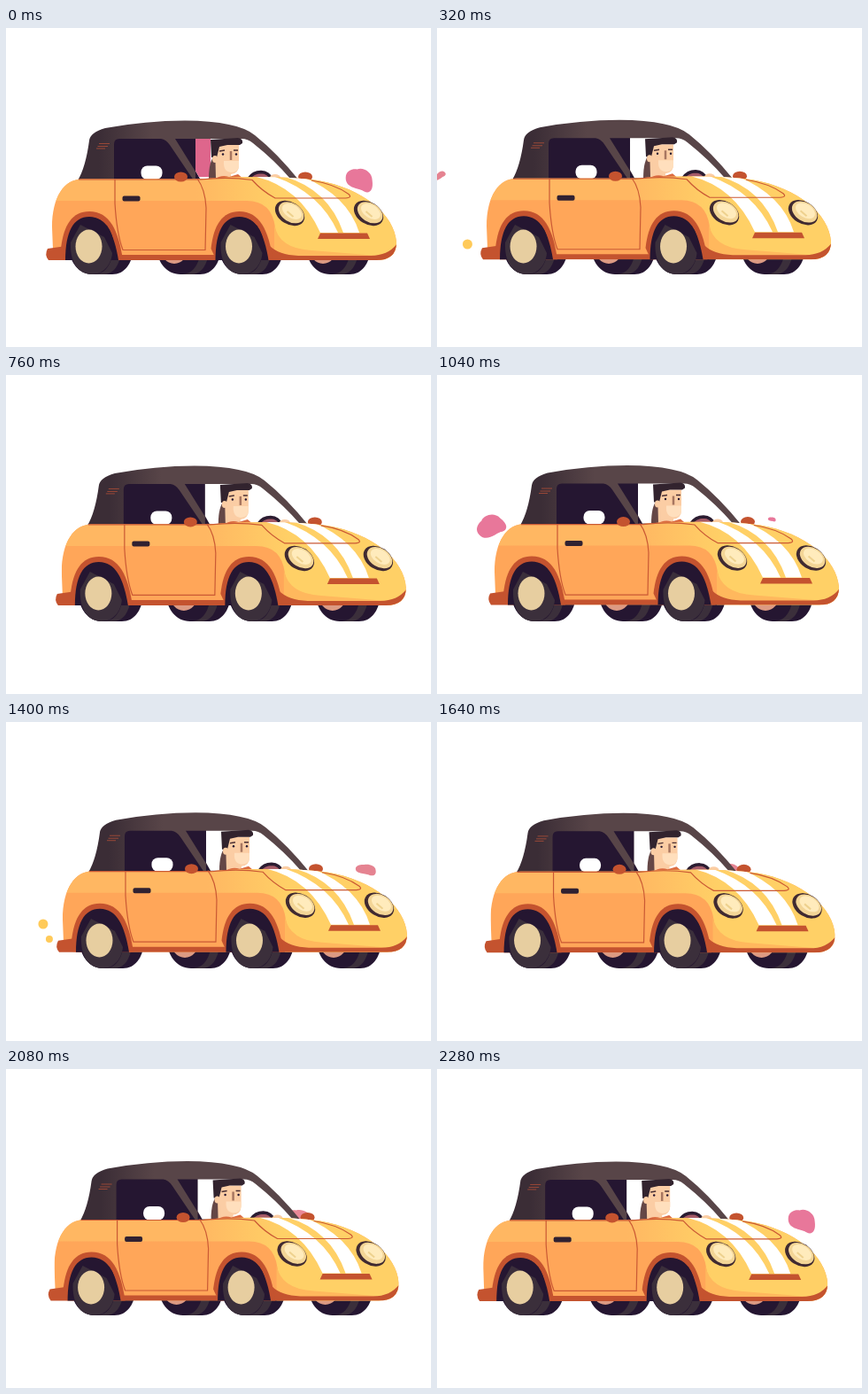
Write an HTML page that moves like this. It is 480 px wide and 360 px high and loops after 2.32 s.

```html
<!DOCTYPE html>
<html lang="en">
<head>
<meta charset="utf-8">
<title>Driving car</title>
<style>
  html, body { margin: 0; width: 100%; height: 100%; overflow: hidden; background: #fff; }
  svg { display: block; width: 100vw; height: 100vh; }
  .red { fill: #c4532f; }
  .dark { fill: #251631; }
  .skin { fill: #fbcda4; }
  .line { fill: none; stroke: #ca5934; stroke-width: 1.2; }
</style>
</head>
<body>
<svg viewBox="0 0 480 360">
  <defs>
    <linearGradient id="shoulder" gradientUnits="userSpaceOnUse" x1="215" x2="310">
      <stop stop-color="#ffb762"/><stop offset="1" stop-color="#ffd066"/>
    </linearGradient>
    <linearGradient id="roof" gradientUnits="userSpaceOnUse" x1="105" x2="165">
      <stop stop-color="#3b2d36"/><stop offset="1" stop-color="#584548"/>
    </linearGradient>
    <clipPath id="shell">
      <path d="M53 250L52 225C52 190 66 170.500 86 170.500H220Q300 165 352 172C404 181 439 211 441 242Q441 262 418 262H70Q53 262 53 250Z"/>
    </clipPath>
    <g id="tire">
      <path class="dark" d="M70 240C70 264 82 278 98 278H120C134 278 142 266 144 250V215H70Z"/>
      <path fill="#3b2f3b" d="M98 278C112 278 119 268 121 250L129 259Q124 278 110 278Z"/>
    </g>
    <g id="well">
      <path class="red" d="M62 249C65 222 75 207 94 207C117 207 127 228 132 262H68Z"/>
      <path class="dark" d="M67 262C67 230 76 213 94 213C113 213 122 232 127 262Z"/>
    </g>
    <g id="wheel">
      <ellipse class="dark" cx="96.500" cy="246" rx="25" ry="32"/>
      <path fill="#3b2f3b" d="M84 222L73 242C72 264 81 278 97 278C111 278 119 266 120 254L111 236Z"/>
      <ellipse id="hub" cx="93.500" cy="246.500" rx="15" ry="19" fill="#e7cea0"/>
    </g>
    <g id="lamp">
      <g transform="rotate(32)">
        <ellipse rx="18" ry="12.500" fill="#402a31"/>
        <ellipse cx="1" cy="-1.500" rx="15.500" ry="10.500" fill="#f3d596"/>
        <ellipse cx="1" cy="-3" rx="12" ry="7.500" fill="#ffebbc"/>
      </g>
      <path d="M-3 -2L4 4" stroke="#eed18e" stroke-width="2"/>
    </g>
  </defs>

  <g id="puffs"></g>

  <g class="roll">
    <use href="#tire" x="99"/>
    <use href="#tire" x="268"/>
    <ellipse cx="190" cy="247" rx="16" ry="19" fill="#dc9a83"/>
    <ellipse cx="358" cy="247" rx="16" ry="19" fill="#dc9a83"/>
    <use href="#tire"/>
    <use href="#tire" x="169.500"/>
  </g>

  <g id="body">
    <!-- cabin -->
    <path fill="url(#roof)" d="M81 172Q90 157 94 127Q95 118 112 113Q158 104.500 202 104.500Q262 105 281 121Q306 141 331 172Z"/>
    <path class="dark" d="M122 172V131Q122 125 128 125H175Q181 126 185 132L212 172Z"/>
    <path class="dark" d="M191 125H214V170H219Z"/>
    <path fill="#fff" d="M214 125H266Q273 125 279 130Q303 149 321 170H219L214 161Z"/>
    <path id="flash" fill="#de668c" d="M214 125H231V168H218L214 161Z"/>
    <rect x="152.500" y="155.500" width="24" height="15.500" rx="7" fill="#fff"/>
    <path d="M105 130.500H117M103.500 133.500H115M102 136H112" stroke="#9a4837"/>

    <!-- driver -->
    <path fill="#654746" d="M229 170Q229 150 236 143L245 170Z"/>
    <path class="skin" d="M236 132H263V155Q263 164 254 165V170H237Z"/>
    <path fill="#ffdfbd" d="M246 150H263V156Q262 163 254 163Q245 162 246 150Z"/>
    <path fill="#32232e" d="M231 126L262 124Q268 125 267 130L264 132H250L241 134L238 146H232Z"/>
    <ellipse class="skin" cx="236" cy="148" rx="3" ry="4"/>
    <path d="M241 139L247 138M257 138L262 138" stroke="#4a2f33" stroke-width="1.400"/>
    <circle class="dark" cx="245" cy="142.500" r="1.200"/>
    <circle class="dark" cx="260" cy="142.500" r="1.200"/>
    <path d="M254 139V149" stroke="#a77660" stroke-width="2.500"/>
    <path fill="#db6b40" d="M235 171Q243 165 252 168L262 165L269 171Z"/>
    <path class="skin" d="M268 171Q275 165 284 171Z"/>
    <path fill="#a65b69" stroke="#2b1c31" stroke-width="3.500" d="M274 170Q279 162.500 288 162.500Q297 163 300 171"/>
    <ellipse class="skin" cx="304" cy="169" rx="6" ry="4"/>

    <!-- bodywork -->
    <ellipse class="red" cx="338" cy="168" rx="8" ry="5.500"/>
    <g clip-path="url(#shell)">
      <path fill="#ffa659" d="M45 160H450V270H45Z"/>
      <path fill="url(#shoulder)" d="M45 160H450V270H345Q308 256 304 225Q300 195 272 195H45Z"/>
      <path fill="#ffb85d" d="M303 222Q308 249 345 251L420 257V264H303Z"/>
      <path fill="#fff" d="M283 168Q332 180 355 231H375Q355 186 304 168Z"/>
      <path fill="#fff" d="M315 168Q364 182 381 231H399Q386 189 335 168Z"/>
      <path class="red" d="M128 256H242V264H128Z"/>
      <path class="red" d="M298 246Q308 256 330 257H412Q432 257 442 243V266H298Z"/>
    </g>
    <path class="line" d="M123 171V198Q125 232 132 250.500H225L226 203Q225 182 216 170"/>
    <path class="line" d="M82 171H220Q250 167.500 278 171.500Q289 184 304 192H381Q392 192 387 187.500Q371 176 345 172"/>
    <rect x="131.500" y="189.500" width="20" height="6" rx="2" fill="#302131"/>
    <path class="red" d="M47 249L68 246V262H48Q43 256 47 249Z"/>
    <use href="#well"/>
    <use href="#well" x="169.500"/>
    <ellipse class="red" cx="197.500" cy="168" rx="7.500" ry="5.500"/>
    <use href="#lamp" x="320.500" y="209"/>
    <use href="#lamp" x="409.500" y="209"/>
    <path class="red" d="M355 231.500H408L411 238H352Z"/>
  </g>

  <g class="roll">
    <use href="#wheel"/>
    <use href="#wheel" x="169.500"/>
  </g>
</svg>
<script>
const LOOP = 2320, SPEED = 0.325;
const $ = s => document.querySelector(s);
const clamp = v => Math.max(0, Math.min(1, v));

// time, forward shift of the car
const drift = [[0, 0], [320, 4], [520, 8], [800, 11.300], [1040, 13], [1140, 13.200],
  [1400, 12], [1680, 8], [1880, 5], [2280, 0.200], [2320, 0]];

function shift(t) {
  const i = drift.findIndex(k => k[0] > t);
  const [t0, a] = drift[i - 1], [t1, b] = drift[i];
  return a + (b - a) * (t - t0) / (t1 - t0);
}

// born: time of first sight; x, y: place then; w, h: half size; end: x where it vanishes
const puffs = [
  { born: 2200, x: 438, y: 172, w: 15, h: 14, color: '#e8779a', end: -20 },
  { born: 1340, x: 426, y: 167, w: 13, h: 7.500, color: '#e58391', end: -10 },
  { born: 1800, x: 421, y: 168, w: 14, h: 9.500, color: '#e98896', end: 10 },
  { born: 980, x: 398, y: 163, w: 5, h: 3, color: '#e8779a', end: 300 },
  { born: 150, x: 90, y: 244, w: 5.500, h: 5.500, color: '#ffca59', end: 5 },
  { born: 1250, x: 91, y: 228, w: 5.500, h: 5.500, color: '#ffca59', end: 15 },
  { born: 1250, x: 98, y: 245, w: 4, h: 4, color: '#ffca59', end: 20 }
];
for (const p of puffs) {
  p.el = document.createElementNS('http://www.w3.org/2000/svg', 'path');
  p.el.setAttribute('fill', p.color);
  const round = p.w === p.h;
  p.el.setAttribute('d', round
    ? 'M-1 0A1 1 0 1 1 1 0A1 1 0 1 1 -1 0Z'
    : 'M-1 -.2C-1 -.8 -.5 -.95 -.15 -.9C.3 -1.1 1 -.7 1 0C1.1 .8 .8 1.1 .4 .9C.1 .6 -1 .7 -1 -.2Z');
  $('#puffs').append(p.el);
}

function drawPuff(p, t) {
  const age = (t - p.born + LOOP) % LOOP;
  const x = p.x - SPEED * age;
  const size = clamp(age / 70) * clamp((x - p.end) / 25);
  const turn = p.w > 12 && x < 200;
  p.el.setAttribute('transform',
    `translate(${x} ${p.y}) rotate(${turn ? -45 : 0}) scale(${p.w * size} ${p.h * size})`);
}

function draw(now) {
  const t = now % LOOP, x = shift(t);
  $('#body').setAttribute('transform', `translate(${x} ${-x * 0.19})`);
  document.querySelectorAll('.roll').forEach(g => g.setAttribute('transform', `translate(${x} 0)`));
  $('#flash').style.display = t < 80 ? '' : 'none';
  puffs.forEach(p => drawPuff(p, t));
}

const start = performance.now();
function tick() {
  draw(performance.now() - start);
  requestAnimationFrame(tick);
}
tick();
</script>
</body>
</html>
```
